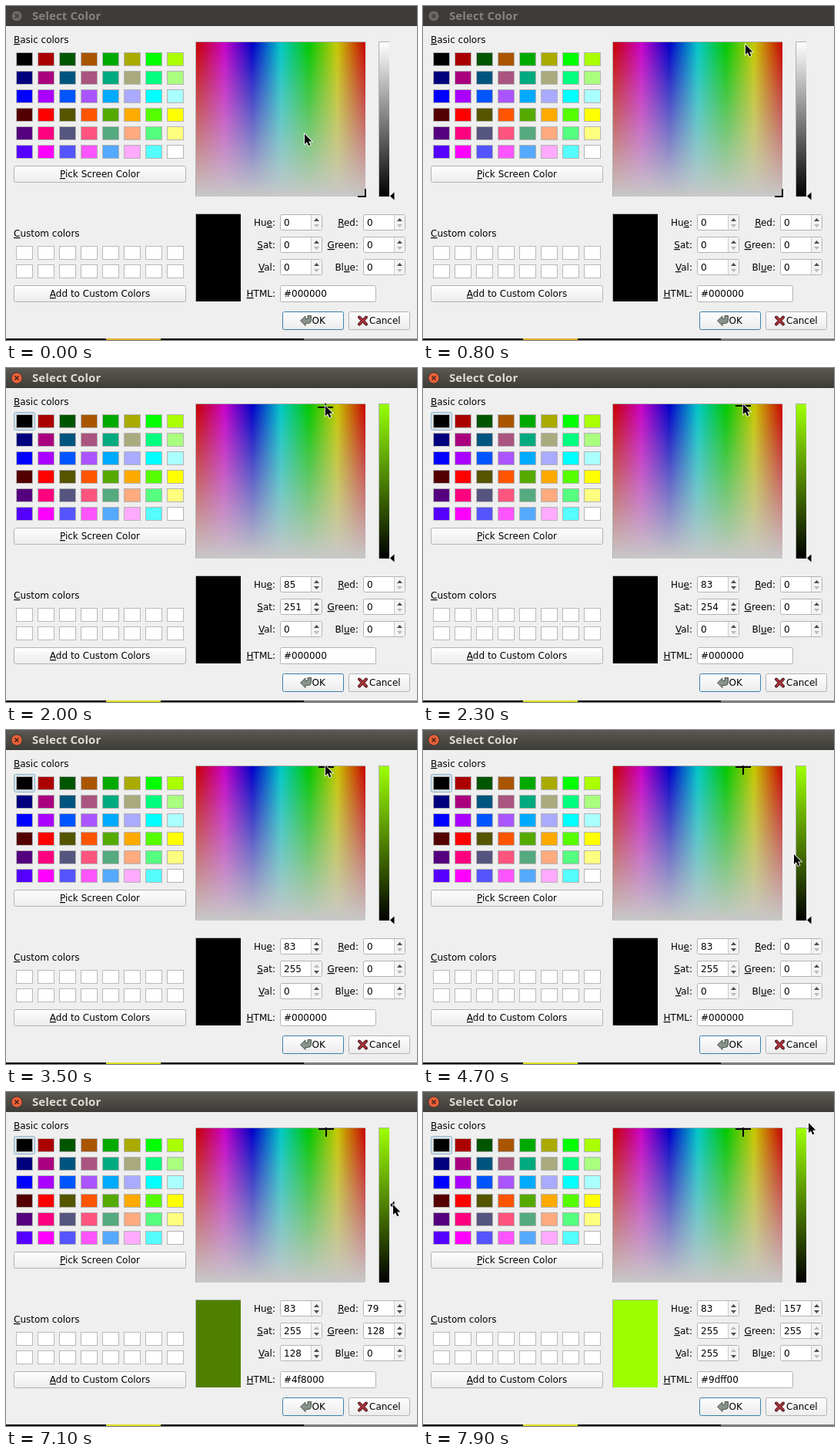
An HTML page for the animation above (8 s loop, 534 px wide and 433 px high).

```html
<!DOCTYPE html>
<html lang="en">
<head>
<meta charset="utf-8">
<title>Select Color</title>
<style>
  html, body { margin: 0; width: 100%; height: 100%; overflow: hidden; background: #efefef; }
  svg { display: block; width: 534px; height: 433px; }
  text { font: 12px "DejaVu Sans", sans-serif; fill: #000; cursor: default; user-select: none; }
  .title { font: bold 15px "Open Sans", sans-serif; letter-spacing: .1px; }
  .key { text-decoration: underline; }
</style>
</head>
<body>
<svg id="stage" viewBox="0 0 534 433" xmlns="http://www.w3.org/2000/svg">
  <defs>
    <linearGradient id="hues"></linearGradient>
    <linearGradient id="fade" x2="0" y2="1">
      <stop offset="0" stop-color="#c8c8c8" stop-opacity="0"/>
      <stop offset="1" stop-color="#c8c8c8"/>
    </linearGradient>
    <linearGradient id="lum" x2="0" y2="1">
      <stop id="lumTop" offset="0"/>
      <stop offset="1" stop-color="#000"/>
    </linearGradient>
    <linearGradient id="button" x2="0" y2="1">
      <stop offset="0" stop-color="#fefefe"/>
      <stop offset="1" stop-color="#ececec"/>
    </linearGradient>
    <linearGradient id="bar" x2="0" y2="1">
      <stop offset="0" stop-color="#5b5952"/>
      <stop offset="1" stop-color="#3d3c38"/>
    </linearGradient>
    <clipPath id="field"><rect x="246" y="46" width="222" height="202"/></clipPath>
  </defs>
</svg>
<script>
const NS = "http://www.w3.org/2000/svg";
const LOOP = 8000, ACTIVE = 1800, RELEASE = 3100, DRAG = 6600;
const stage = document.getElementById("stage");

function add(tag, attrs, parent = stage) {
  const el = document.createElementNS(NS, tag);
  set(el, attrs);
  parent.appendChild(el);
  return el;
}
function set(el, attrs) {
  for (const k in attrs) el.setAttribute(k, attrs[k]);
}
function fill(x, y, width, height, color, parent) {
  return add("rect", { x, y, width, height, fill: color }, parent);
}
function box(x, y, w, h, color, line, r = 0) {
  return add("rect", { x: x + .5, y: y + .5, width: w - 1, height: h - 1, rx: r, fill: color, stroke: line });
}
function path(d, attrs, parent) {
  return add("path", { d, ...attrs }, parent);
}
// "&" marks the underlined access key
function label(str, x, y, anchor = "start") {
  const el = add("text", { x, y, "text-anchor": anchor });
  const i = str.indexOf("&");
  if (i < 0) {
    el.textContent = str;
    return el;
  }
  el.append(str.slice(0, i));
  add("tspan", { class: "key" }, el).textContent = str[i + 1];
  el.append(str.slice(i + 2));
  return el;
}
function hsv(h, s, v) {
  return [5, 3, 1].map(n => {
    const k = (n + h / 60) % 6;
    return Math.round(v * (1 - s / 255 * Math.max(0, Math.min(k, 4 - k, 1))));
  });
}
const hex = rgb => "#" + rgb.map(c => c.toString(16).padStart(2, "0")).join("");
const clamp = (v, lo, hi) => Math.max(lo, Math.min(hi, v));

// Title bar
fill(0, 0, 534, 433, "#efefef");
const titleBar = fill(0, 0, 534, 26, "#3d3c38");
const closeDisc = add("circle", { cx: 14, cy: 13, r: 7.2, stroke: "#32312d" });
const closeMark = path("M11.5 10.5l5 5m0-5l-5 5", { "stroke-width": 1.5 });
const title = add("text", { x: 34, y: 18, class: "title" });
title.textContent = "Select Color";

// Swatches
label("&Basic colors", 10, 48);
const focus = box(10, 57, 28, 24, "#d3e2ea", "#8fb2c6", 2);
for (let i = 0; i < 48; i++) {
  const rgb = [(i / 3 | 0) % 4 * 85, (i / 12 | 0) * 85, Math.floor(i % 3 * 127.5)];
  box(13 + (i / 6 | 0) * 28, 60 + i % 6 * 24, 22, 18, hex(rgb), "#b4b4b4");
}
label("&Custom colors", 10, 299);
for (let i = 0; i < 16; i++) {
  box(13 + i % 8 * 28, 311 + (i / 8 | 0) * 24, 22, 18, "#fff", "#b9b9b9");
}

// Wide buttons
box(10, 207, 224, 22, "url(#button)", "#b3b3b3", 2);
label("&Pick Screen Color", 122, 222, "middle");
box(10, 362, 224, 22, "url(#button)", "#b3b3b3", 2);
label("&Add to Custom Colors", 122, 377, "middle");

// Hue and saturation field
for (let i = 0; i <= 6; i++) {
  add("stop", { offset: i / 6, "stop-color": hex(hsv(360 - i * 60, 255, 200)) }, document.getElementById("hues"));
}
fill(246, 46, 221, 201, "#b0b0b0");
fill(247, 47, 220, 200, "url(#hues)");
fill(247, 47, 220, 200, "url(#fade)");
const field = add("g", { "clip-path": "url(#field)" });
const cross = add("g", {}, field);
fill(-9, 0, 20, 2, "#000", cross);
fill(0, -9, 2, 20, "#000", cross);

// Brightness bar
fill(484, 46, 14, 201, "#b0b0b0");
fill(485, 47, 13, 200, "url(#lum)");
const lumTop = document.getElementById("lumTop");
const pointer = path("M0 0l5.5 -5v10z", { fill: "#000" });

// Preview
fill(246, 269, 59, 114, "#b0b0b0");
const preview = fill(247, 270, 58, 113, "#000");

function spin(name, x, y, max) {
  label(name, x - 6, y + 15, "end");
  box(x, y, 55, 21, "#fff", "#b3b3b3", 2);
  fill(x + 41, y + 1, 13, 19, "#f3f3f3");
  fill(x + 40, y + 1, 1, 19, "#cbcbcb");
  const text = label("0", x + 5, y + 15);
  const up = path(`M${x + 44} ${y + 9}h7l-3.5 -4z`);
  const down = path(`M${x + 44} ${y + 13}h7l-3.5 4z`);
  return v => {
    text.textContent = v;
    set(up, { fill: v < max ? "#4c4c4c" : "#b8b8b8" });
    set(down, { fill: v > 0 ? "#4c4c4c" : "#b8b8b8" });
  };
}
const spins = [
  spin("Hu&e:", 356, 270, 359), spin("&Sat:", 356, 299, 255), spin("&Val:", 356, 328, 255),
  spin("&Red:", 464, 270, 255), spin("&Green:", 464, 299, 255), spin("Bl&ue:", 464, 328, 255)
];
label("&HTML:", 350, 377, "end");
box(356, 362, 125, 22, "#fff", "#b3b3b3", 2);
const html = label("#000000", 361, 377);

// Dialog buttons
box(359, 396, 80, 24, "url(#button)", "#3a7fa8", 2);
path("M382.5 408l6.5 -6v3.5h3v-4h4.5v6q0 4 -4 4h-3.5v3z",
  { fill: "#87938a", stroke: "#4c544d", "stroke-linejoin": "round" });
label("OK", 397.5, 412);
box(445, 396, 80, 24, "url(#button)", "#b3b3b3", 2);
const ex = "M459 403.5l9 9m0-9l-9 9";
path(ex, { stroke: "#5b2327", "stroke-width": 4, "stroke-linecap": "round" });
path(ex, { stroke: "#b0323a", "stroke-width": 2 });
label("Cancel", 472, 412);

// Strip below the window
fill(0, 431, 387, 2, "#0b0b0e");
fill(387, 431, 147, 2, "#7b7b7b");
const strip = fill(130, 431, 71, 2, "#dfb02c");

const cursor = path("M0 0V13L3 10.3L5.2 15.2L7.4 14.2L5.2 9.5H9.3z",
  { fill: "#000", stroke: "#fff", "stroke-width": 1.6, "paint-order": "stroke" });

// Mouse path: time, x, y
const moves = [
  [0, 388, 166], [800, 419, 50], [900, 420, 46], [1000, 420, 46], [1300, 414, 50],
  [1400, 414, 50], [1500, 414, 51], [1700, 414, 51], [1800, 414, 50], [2300, 416, 47],
  [2700, 416, 47], [2800, 415, 46], [2900, 415, 46], [3000, 414, 46], [3100, 416, 46],
  [3400, 416, 46], [3500, 415, 46], [3900, 415, 46], [4000, 415, 48], [4300, 415, 48],
  [4800, 499, 189], [4900, 499, 189], [5500, 501, 250], [5800, 502, 243], [6000, 503, 246],
  [6200, 503, 246], [6300, 503, 245], [6400, 504, 245], [6500, 504, 245], [6600, 504, 243],
  [7400, 503, 87], [7900, 501, 40]
];
function mouse(t) {
  const n = moves.findIndex(m => m[0] > t);
  if (n < 0) return moves[moves.length - 1].slice(1);
  const a = moves[n - 1], b = moves[n], u = (t - a[0]) / (b[0] - a[0]);
  return [1, 2].map(i => Math.round(a[i] + (b[i] - a[i]) * u));
}
function picked(t) {
  if (t < ACTIVE) return [0, 0, 0];
  const [x, y] = mouse(Math.min(t, RELEASE));
  const h = Math.floor(360 - (x - 247) * 360 / 220);
  const s = clamp(Math.round(255 - (y - 46) * 255 / 200), 0, 255);
  const v = t < DRAG ? 0 : clamp(Math.round((246 - mouse(t)[1]) * 255 / 199), 0, 255);
  return [h, s, v];
}

function draw(time) {
  const t = Math.floor(time % LOOP / 100) * 100;
  const on = t >= ACTIVE;
  const [h, s, v] = picked(t), rgb = hsv(h, s, v);

  set(titleBar, { fill: on ? "url(#bar)" : "#3d3c38" });
  set(closeDisc, { fill: on ? "#e8603a" : "#6c6a65" });
  set(closeMark, { stroke: on ? "#4a2317" : "#3d3c38" });
  title.style.fill = on ? "#dfdbd2" : "#85837c";
  set(focus, { visibility: on ? "visible" : "hidden" });
  set(strip, { fill: on ? "#dcdf25" : "#dfb02c" });

  const px = 246 + Math.round(220 - h * 220 / 360), py = 246 - Math.round(s * 199 / 255);
  set(cross, { transform: `translate(${px} ${py})` });
  set(lumTop, { "stop-color": hex(hsv(h, s, 255)) });
  set(pointer, { transform: `translate(499 ${246.5 - v * 199 / 255})` });
  set(preview, { fill: hex(rgb) });
  [h, s, v, ...rgb].forEach((n, i) => spins[i](n));
  html.textContent = hex(rgb);
  set(cursor, { transform: `translate(${mouse(t).join(" ")})` });
}

let start;
function tick(now) {
  if (start === undefined) start = now;
  draw(now - start);
  requestAnimationFrame(tick);
}
draw(0);
requestAnimationFrame(tick);
</script>
</body>
</html>
```
